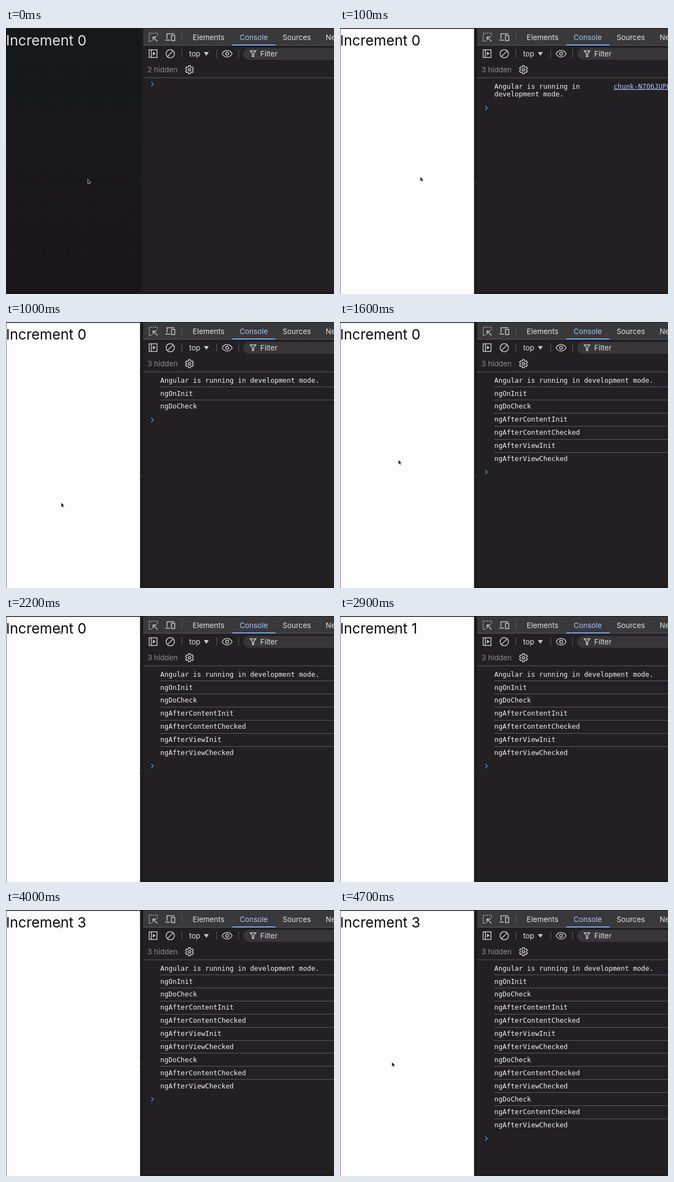
An HTML page for the animation above (4.8 s loop, 600 by 486 pixels).

```html
<!DOCTYPE html>
<html lang="en">
<head>
<meta charset="utf-8">
<title>Lifecycle hooks in the console</title>
<style>
  html, body { margin: 0; width: 100%; height: 100%; overflow: hidden; background: #1b1a1c; }
  svg { display: block; width: 600px; height: 486px; }
  text { white-space: pre; }
  .ui { font: 13.4px Inter, sans-serif; fill: #e3e1e5; }
  .log { font: 12.4px "DejaVu Sans Mono", monospace; fill: #f3f1f4; }
  .ui .active, .link { fill: #a8c7fa; }
  .ui .muted { fill: #8f8d91; }
  .icon { fill: none; stroke: #c9c7cb; stroke-width: 1.5; }
  .solid { fill: #c9c7cb; stroke: none; }
  .rule { fill: none; stroke: #5d5b5f; }
  #count { font: 26px Inter, sans-serif; }
</style>
</head>
<body>
<svg viewBox="0 0 600 486">
  <defs>
    <linearGradient id="dusk" x2="0" y2="1">
      <stop offset="0" stop-color="#161919"/>
      <stop offset=".25" stop-color="#151819"/>
      <stop offset=".34" stop-color="#181719"/>
      <stop offset="1" stop-color="#181618"/>
    </linearGradient>
  </defs>

  <rect width="600" height="486" fill="#1b1a1c"/>
  <rect id="page" x=".6" y="1.5" width="244.6" height="484.5"/>
  <text id="count" x="0" y="32"></text>
  <circle cx="248" cy="281.5" r="1.3" fill="#434145"/>

  <rect x="251" y="1" width="349" height="482" fill="#222023"/>
  <rect x="251" y="1" width="349" height="30" fill="#39383a"/>
  <path class="rule" d="M251 31.5H600M251 91H600"/>
  <path class="rule" d="M321.5 9v15M321.5 39v15M385.5 39v15M425.5 39v15"/>
  <rect x="414" y="30" width="79" height="2" fill="#7cacf8"/>
  <rect x="434" y="36.5" width="190" height="21.5" rx="10.7" fill="#383639"/>

  <g class="ui">
    <text x="341.6" y="21.7">Elements</text>
    <text x="427.3" y="21.7" class="active">Console</text>
    <text x="505.9" y="21.7">Sources</text>
    <text x="584.8" y="21.7">Network</text>
    <text x="335" y="51.8">top</text>
    <text x="465" y="51.8">Filter</text>
    <text id="hidden" class="muted" x="258.7" y="81.3"></text>
  </g>

  <g class="icon">
    <path d="M262 24V9.5H277V15M262 24H267" stroke-dasharray="1.8 1.8"/>
    <path d="M269 22.5V16.5H275.5M269.5 17L277 24.5"/>
    <path d="M294.5 20V10.5H308M291.5 22.2H300"/>
    <rect x="302.7" y="13.5" width="6" height="9.5"/>
    <rect x="261.8" y="39.8" width="14.5" height="14"/>
    <path d="M266 40V54"/>
    <path class="solid" d="M268.8 43.3L273.8 46.8L268.8 50.3Z"/>
    <circle cx="300.5" cy="47" r="7.6"/>
    <path d="M295.2 52.3L305.8 41.7"/>
    <path class="solid" d="M362 44H371L366.5 50.8Z"/>
    <path d="M395.3 47Q398.5 41 404.5 41T413.7 47Q410.5 53 404.5 53T395.3 47Z"/>
    <circle cx="404.5" cy="47" r="2.7"/>
    <path d="M446.8 41.7H457L453.2 46.8V52.2H450.7V46.8Z"/>
    <path id="gear" transform="translate(335.6 76.2)" stroke-linejoin="round"/>
    <circle cx="335.6" cy="76.2" r="2.2"/>
  </g>

  <g id="logs"></g>
  <path id="prompt" d="M-2 -3.8L1.8 0L-2 3.8" fill="none" stroke="#4f86c9" stroke-width="1.5"/>
  <path id="pointer" d="M0 0V8L1.8 6.4L3 9L4.3 8.4L3.1 5.9H5.6Z" stroke-width=".8"/>
</svg>

<script>
const LOOP = 4800, STEP = 100, ROW = 23.88;
const $ = id => document.getElementById(id);

const checks = ["ngDoCheck", "ngAfterContentChecked", "ngAfterViewChecked"];
const messages = [
  "Angular is running in development mode.", "ngOnInit", "ngDoCheck",
  "ngAfterContentInit", "ngAfterContentChecked", "ngAfterViewInit", "ngAfterViewChecked",
  ...checks, ...checks
];

// [start time, value]
const rowCounts = [[0, 0], [300, 3], [1100, 7], [3400, 10], [4100, 13]];
const counts = [[0, 0], [2300, 1], [3300, 2], [3900, 3]];

// [time, x, y] of the pointer tip
const track = [
  [0, 149.5, 276], [100, 147, 272], [600, 126, 300], [1000, 101, 330], [1300, 97, 330],
  [1600, 107, 252], [1800, 104, 262], [2200, 98, 25], [4200, 98, 25], [4700, 95, 278]
];

const valueAt = (list, t) => list.filter(([start]) => start <= t).pop()[1];

function pointerAt(t) {
  const i = Math.max(1, track.findIndex(p => p[0] >= t));
  const [t0, x0, y0] = track[i - 1], [t1, x1, y1] = track[i];
  const k = (t - t0) / (t1 - t0), e = k * k * (3 - 2 * k);
  return [x0 + (x1 - x0) * e, y0 + (y1 - y0) * e];
}

// Six teeth, each a pair of outer corners between a pair of inner ones
function gearPath() {
  const points = [];
  for (let tooth = 0; tooth < 6; tooth++) {
    for (const [turn, r] of [[-20, 5.6], [-13, 7.6], [13, 7.6], [20, 5.6]]) {
      const a = (tooth * 60 + turn) * Math.PI / 180;
      points.push(`${r * Math.sin(a)} ${-r * Math.cos(a)}`);
    }
  }
  return "M" + points.join("L") + "Z";
}

const line = (text, y, x = 282.3, extra = "") =>
  `<text class="log" x="${x}" y="${y}" ${extra}>${text}</text>`;

function logMarkup(rows, wrapped) {
  if (wrapped) {
    return line("Angular is running in", 110.7) + line("development mode.", 125.3) +
      line("chunk-N7O6JUPE.js:1", 110.7, 500.5, 'style="fill:#a8c7fa" text-decoration="underline"');
  }
  return messages.slice(0, rows).map((text, i) => {
    const y = 110.7 + i * ROW;
    const rule = i ? `<path class="rule" d="M282 ${Math.round(y - 16.4) + .5}H600"/>` : "";
    return rule + line(text, y);
  }).join("");
}

let shown = -1;
function draw(t) {
  const dark = t < 100, wrapped = t >= 100 && t < 300;
  const rows = valueAt(rowCounts, t);
  const [x, y] = pointerAt(t);
  const overText = y < 36;

  $("page").setAttribute("fill", dark ? "url(#dusk)" : "#fdfcfe");
  $("count").setAttribute("fill", dark ? "#e2e3e3" : "#0b0b0c");
  $("count").textContent = "Increment " + valueAt(counts, t);
  $("hidden").textContent = (dark ? 2 : 3) + " hidden";
  $("logs").innerHTML = logMarkup(rows, wrapped);

  const promptY = wrapped ? 146.3 : rows ? 107 + rows * ROW : 102.8;
  $("prompt").setAttribute("transform", `translate(267.7 ${promptY})`);

  const pointer = $("pointer");
  pointer.setAttribute("transform", `translate(${x} ${y})`);
  pointer.setAttribute("fill", overText ? "#88878b" : "#09090a");
  pointer.setAttribute("stroke", dark ? "#d8d8da" : overText ? "#c5c4c8" : "#b9b8bc");
}

function tick() {
  const t = Math.floor(performance.now() % LOOP / STEP) * STEP;
  if (t !== shown) draw(shown = t);
  requestAnimationFrame(tick);
}

$("gear").setAttribute("d", gearPath());
tick();
</script>
</body>
</html>
```
